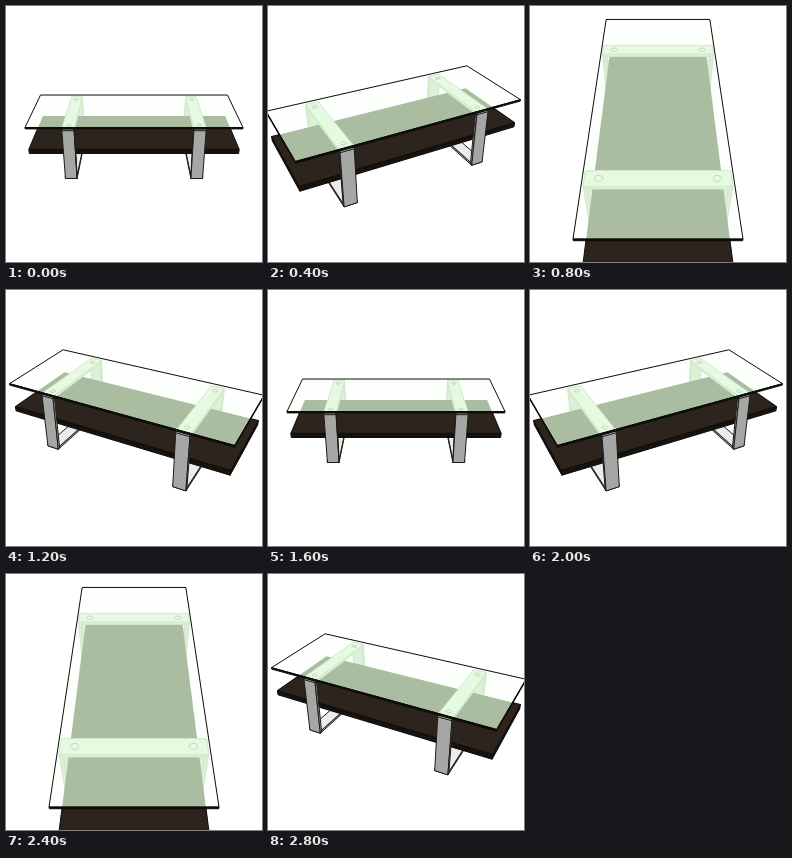
Animation, 256 px wide and 256 px high, one loop 3200 ms. Source, as an HTML page with a canvas:

```html
<!DOCTYPE html>
<html lang="en">
<head>
<meta charset="utf-8">
<title>Glass table turntable</title>
<style>
  html, body { margin: 0; width: 100%; height: 100%; overflow: hidden; background: #fff; }
  canvas { display: block; width: 100vw; height: 100vh; }
</style>
</head>
<body>
<canvas id="stage" width="256" height="256"></canvas>
<script>
const ctx = document.getElementById('stage').getContext('2d');
const SIZE = 256, STEP = 400, FOCAL = 474;
const INK = '#0c0c0a';

// Table space: u along the length, w towards the front, d down from the glass.
// Half the depth of the glass is one unit.
const GLASS = { length: 2.48, width: 1, thickness: 0.035 };
const SHELF = { length: 2.46, width: 0.95, top: 0.59, bottom: 0.7 };
const LEG = { offset: 1.51, half: 0.14, reach: 0.98, thickness: 0.05, top: 0.04, bottom: 1.37 };

const bare = {
  wood: { top: '#2d241e', wall: '#17120e', line: INK },
  steel: { top: '#ececec', wall: '#a6a6a5', line: '#1c1c1a' },
};
const underGlass = {
  wood: { top: '#aabda1', wall: '#a3b69a' },
  steel: { top: '#e6fae1', wall: '#dcf0d6', line: '#d3e8cd' },
};

const front = { yaw: 0, pitch: 26.3, distance: 11.68, lift: 0.591 };
const right = { yaw: 27.4, pitch: 32, distance: 9.92, lift: 0.6 };
const left = { ...right, yaw: -right.yaw };
const end = { yaw: 90, pitch: 44, distance: 7.36, lift: 0.487 };
const views = [front, left, end, right];

const radians = degrees => degrees * Math.PI / 180;

function makeCamera({ yaw, pitch, distance, lift }) {
  const cosYaw = Math.cos(radians(yaw)), sinYaw = Math.sin(radians(yaw));
  const cosPitch = Math.cos(radians(pitch)), sinPitch = Math.sin(radians(pitch));
  const project = ([u, w, d]) => {
    const across = u * cosYaw - w * sinYaw;
    const near = u * sinYaw + w * cosYaw;
    const scale = FOCAL / (distance - near * cosPitch + d * sinPitch);
    const height = lift - near * sinPitch - d * cosPitch;
    return [SIZE / 2 + across * scale, SIZE / 2 - height * scale];
  };
  return { project, facesFront: cosYaw > 0.1 };
}

function trace(points) {
  ctx.beginPath();
  for (const [x, y] of points) ctx.lineTo(x, y);
  ctx.closePath();
}

function poly(points, fill, line, width = 1) {
  trace(points);
  if (fill) { ctx.fillStyle = fill; ctx.fill(); }
  if (line) { ctx.strokeStyle = line; ctx.lineWidth = width; ctx.stroke(); }
}

// Positive when the corners run clockwise on screen, so the face is visible.
function signedArea(points) {
  return points.reduce((sum, [x, y], i) => {
    const [nextX, nextY] = points[(i + 1) % points.length];
    return sum + x * nextY - nextX * y;
  }, 0);
}

const ringOf = (u0, u1, w0, w1) => [[u0, w0], [u0, w1], [u1, w1], [u1, w0]];

function box(camera, [u0, u1], [w0, w1], [d0, d1], { top, wall, line }) {
  const ring = ringOf(u0, u1, w0, w1);
  const level = d => ring.map(([u, w]) => camera.project([u, w, d]));
  const upper = level(d0), lower = level(d1);
  for (let i = 0; i < 4; i++) {
    const j = (i + 1) % 4;
    const face = [upper[i], upper[j], lower[j], lower[i]];
    if (signedArea(face) > 0) poly(face, wall, line);
  }
  poly(upper, top, line);
}

function pad(camera, u, w, line) {
  const circle = Array.from({ length: 16 }, (_, i) => {
    const angle = i * Math.PI / 8;
    return camera.project([u + 0.055 * Math.cos(angle), w + 0.055 * Math.sin(angle), LEG.top]);
  });
  poly(circle, null, line, 0.8);
}

function drawFrame(camera, { wood, steel }) {
  const { offset, half, reach, thickness, top, bottom } = LEG;
  const legPart = (wRange, dRange) => {
    for (const side of [-1, 1]) {
      const u = side * offset;
      box(camera, [u - half, u + half], wRange, dRange, steel);
    }
  };
  const frontUprights = () => legPart([reach - thickness, reach], [top, bottom]);

  legPart([-reach, reach], [bottom - thickness, bottom]);
  legPart([-reach, thickness - reach], [top, bottom]);
  if (!camera.facesFront) frontUprights();
  box(camera, [-SHELF.length, SHELF.length], [-SHELF.width, SHELF.width],
    [SHELF.top, SHELF.bottom], wood);
  if (camera.facesFront) frontUprights();
  legPart([-reach, reach], [top, top + thickness]);
}

function drawTable(camera) {
  const { length, width, thickness } = GLASS;
  drawFrame(camera, bare);

  const pane = ringOf(-length, length, -width, width)
    .map(([u, w]) => camera.project([u, w, 0]));
  ctx.save();
  trace(pane);
  ctx.clip();
  poly(pane, '#fdfffc');
  drawFrame(camera, underGlass);
  for (const u of [-LEG.offset, LEG.offset])
    for (const w of [-0.79, 0.79]) pad(camera, u, w, '#b9cfb3');
  ctx.restore();

  box(camera, [-length, length], [-width, width], [0, thickness],
    { wall: INK, line: INK });
}

const cameras = views.map(makeCamera);

function render(now) {
  ctx.fillStyle = '#fff';
  ctx.fillRect(0, 0, SIZE, SIZE);
  drawTable(cameras[Math.floor(now / STEP) % cameras.length]);
  requestAnimationFrame(render);
}

ctx.lineJoin = 'round';
render(0);
</script>
</body>
</html>
```
